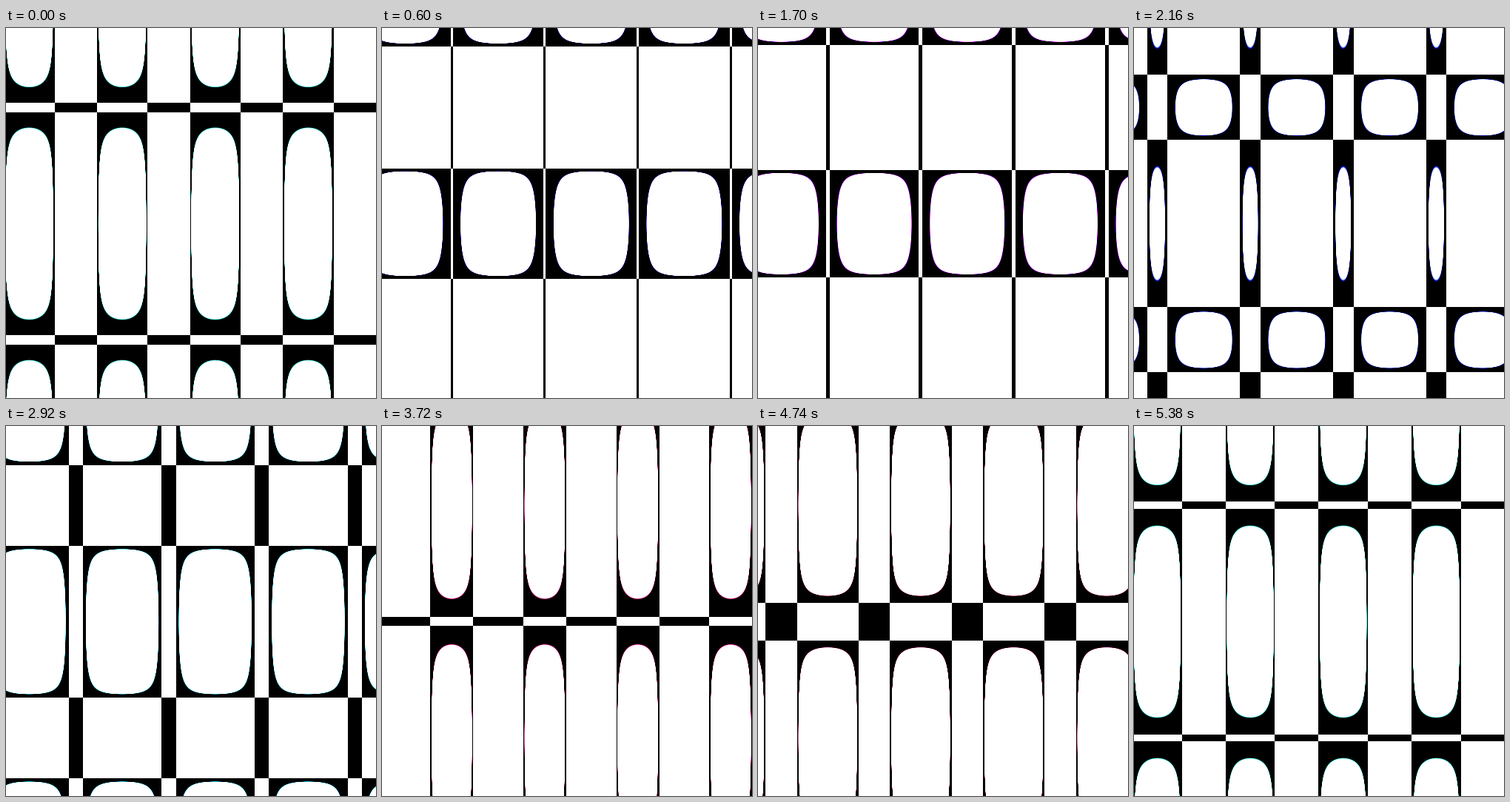
An HTML page with a canvas for the animation above (5400 ms loop, 500 by 500 pixels).

```html
<!DOCTYPE html>
<html lang="en">
<head>
<meta charset="utf-8">
<title>Reciprocal sine grid</title>
<style>
  html, body { margin: 0; width: 100%; height: 100%; overflow: hidden; background: #fff; }
  canvas { display: block; width: 500px; height: 500px; }
</style>
</head>
<body>
<canvas id="stage" width="500" height="500"></canvas>
<script>
const SIZE = 500, LOOP = 5400, STEP = 20;
const GAIN = 2.2, LEVEL = 6.43;

const ctx = document.getElementById('stage').getContext('2d');
const image = ctx.createImageData(SIZE, SIZE);
const px = image.data.fill(255);

const wave = (at) => Float64Array.from({ length: SIZE }, (_, i) => Math.sin(at(i + 0.5)));
const waveX = wave(x => x / 20);
const waveY = wave(y => (SIZE - y) / 50);

// steady turn with a quick start and a slight surge past the middle
function phaseAt(step) {
  const start = 1.565 * Math.exp(-step / 12);
  const surge = 0.108 * Math.exp(-(((step - 146) / 28) ** 2));
  return step / 9 + 1.43 - start + surge;
}

// red and green swing against each other, blue at half their speed
function tintAt(phase) {
  const swing = Math.cos(0.4 * (phase - 1));
  return [
    0.5 - 0.5 * swing,
    0.35 + 0.35 * swing,
    0.8 + 0.4 * Math.sin(0.2 * (phase - 2))
  ];
}

function draw(step) {
  const phase = phaseAt(step);
  const [r, g, b] = tintAt(phase);
  const sin = Math.sin(phase), cos = Math.cos(phase);
  let i = 0;
  for (let y = 0; y < SIZE; y++) {
    const v = waveY[y] - cos;
    for (let x = 0; x < SIZE; x++, i += 4) {
      const glow = GAIN * (LEVEL + 1 / ((waveX[x] - sin) * v));
      px[i] = 255 * (r + glow);
      px[i + 1] = 255 * (g + glow);
      px[i + 2] = 255 * (b + glow);
    }
  }
  ctx.putImageData(image, 0, 0);
}

let shown = -1;
function tick() {
  const step = Math.floor(performance.now() % LOOP / STEP);
  if (step !== shown) draw(shown = step);
  requestAnimationFrame(tick);
}
tick();
</script>
</body>
</html>
```
